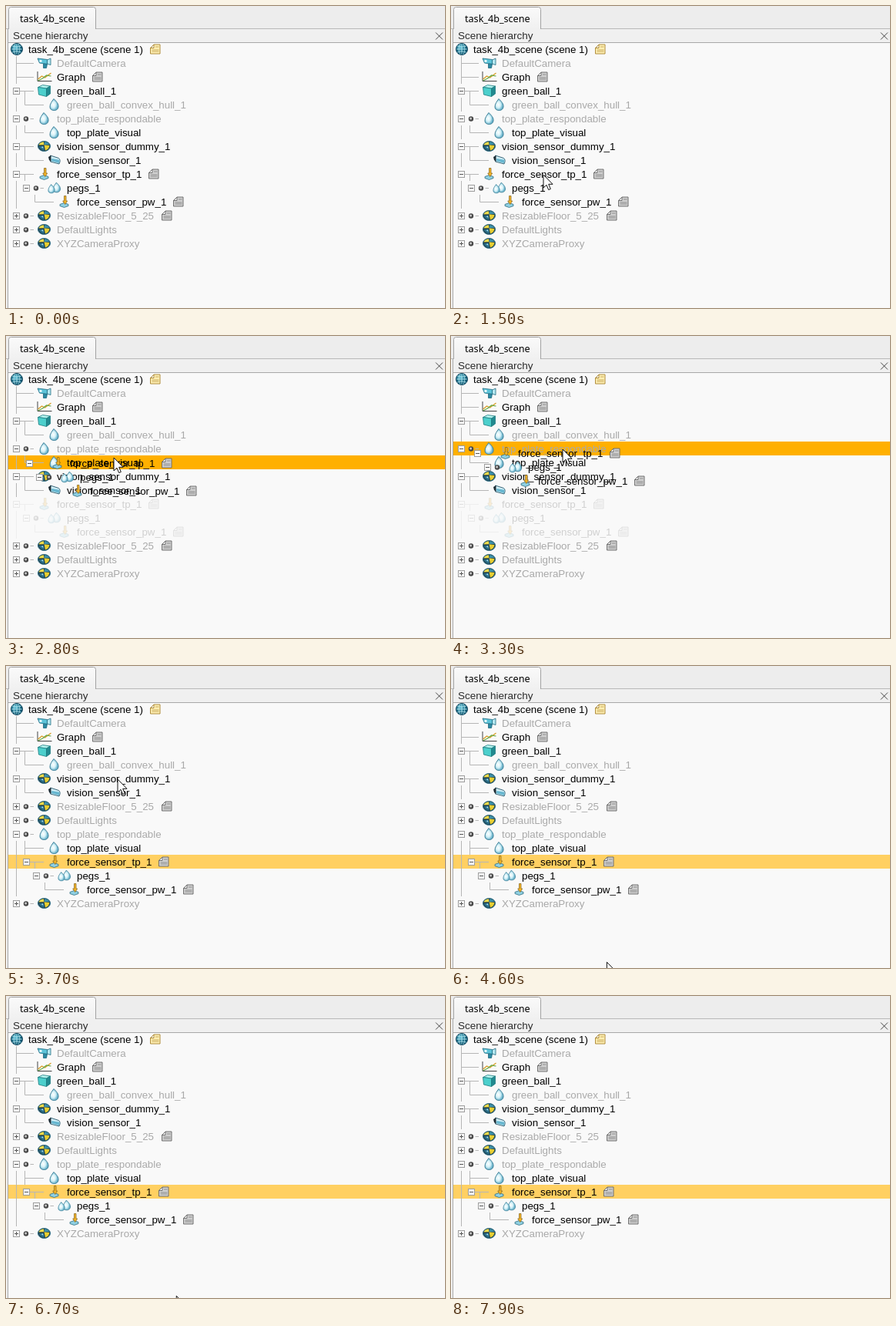
An HTML page for the animation above (8 s loop, 570 px wide and 392 px high).

```html
<!DOCTYPE html>
<html lang="en">
<head>
<meta charset="utf-8">
<title>Scene hierarchy</title>
<style>
  html, body { margin: 0; width: 100%; height: 100%; overflow: hidden; background: #f9f9f9; }
  svg { display: block; width: 570px; height: 392px; }
  text { font: 13.33px "Liberation Sans", Arial, sans-serif; fill: #000; white-space: pre; }
  .dim { fill: #a9a9a9; }
  .tab { font: 12.6px "Noto Sans", sans-serif; }
  .head { font-size: 13.5px; fill: #2c2c2c; }
  .link { fill: none; stroke: #b6b6b6; }
</style>
</head>
<body>
<svg viewBox="0 0 570 392">
  <defs>
    <linearGradient id="tabFill" x2="0" y2="1"><stop stop-color="#fafafa"/><stop offset="1" stop-color="#f0f0f0"/></linearGradient>
    <radialGradient id="dropFill" cx=".4" cy=".5"><stop stop-color="#fff"/><stop offset=".55" stop-color="#d3f1f8"/><stop offset="1" stop-color="#6bb4cc"/></radialGradient>
    <radialGradient id="globeFill" cx=".4" cy=".35"><stop stop-color="#62c6dc"/><stop offset="1" stop-color="#07536f"/></radialGradient>
    <g id="globe">
      <circle r="7.5" fill="url(#globeFill)" stroke="#0b4058"/>
      <path d="M-7 0H7M0-7V7M-6-4Q0-2 6-4M-6 4Q0 2 6 4M-2-7Q-6 0-2 7M2-7Q6 0 2 7" fill="none" stroke="#b5e6ef" stroke-width=".8"/>
    </g>
    <g id="camera" stroke="#1d6a80" stroke-width=".8">
      <path d="M-8.5-6L4-4.5V1.5L-6 0Z" fill="#5cc3d8"/>
      <path d="M4-4L8.5-6V2.5L4 1Z" fill="#b4e8f1"/>
      <path d="M-1 1L4 1.5L3 6.5H-1Z" fill="#2b8aa3"/>
      <circle cx="-4.5" cy="-2.6" r="1.7" fill="#e6fafd" stroke="none"/>
    </g>
    <g id="graph" fill="none">
      <path d="M-8.5-7V5.5H10" stroke="#444"/>
      <path d="M-8 3L-3-1L1 1L9-5" stroke="#d89a20" stroke-width="1.2"/>
      <path d="M-8 5L-2 2L3-2L9-1" stroke="#63a846" stroke-width="1.2"/>
    </g>
    <g id="cube" stroke="#1d7b80" stroke-width=".8">
      <path d="M-8-4.5L-2-7.5L8-6L3-3Z" fill="#b2f2ee"/>
      <path d="M-8-4.5L3-3V7.5L-7 5Z" fill="#4ccfcc"/>
      <path d="M3-3L8-6V4L3 7.5Z" fill="#218a90"/>
    </g>
    <path id="drop" d="M-.5-7.5C3-4 6-1 5.5 3C5 6 3 7.5 0 7.5C-3 7.5-5.5 6-5.5 3C-5.5-1-3-4-.5-7.5Z" fill="url(#dropFill)" stroke="#3f8098"/>
    <g id="pegs">
      <use href="#drop" transform="translate(3.3 -.5)scale(.85)"/>
      <use href="#drop" transform="translate(-3.5 1.2)scale(.75)"/>
    </g>
    <g id="dummy">
      <ellipse rx="8" ry="6.5" fill="#1b3440" stroke="#2d6f86"/>
      <path d="M-7-1.5Q-5.5-5.5-.5-5.8L0-1.8Z" fill="#eedc4a"/>
      <path d="M0-1.8L7-1Q6.5 4 1.5 5.5Z" fill="#e8cf32"/>
      <path d="M.5-5.8Q5-5.5 7-2L0-1.8Z" fill="#3b8ea9"/>
      <path d="M-7 0L-.5-.5L.5 5.8Q-5.5 5-7 0Z" fill="#286d88"/>
      <path d="M-4 1L-1.5.6L-1 3Z" fill="#a9dfed"/>
    </g>
    <g id="vision">
      <path d="M-5-6L6-2.5Q9 0 6.5 5L-5 2Z" fill="#d3f0f8" stroke="#27566a" stroke-width=".9"/>
      <path d="M-4 1L6.5 4L7-.2L-3-2Z" fill="#68b7d0"/>
      <path d="M-7.5-4L-4-6V2L-6.5 0Z" fill="#1d2b33"/>
    </g>
    <g id="force">
      <path d="M-5.5 3.5L0 1.5L5.5 3.5V5.5L0 7.5L-5.5 5.5Z" fill="#8fd0e2" stroke="#2f6c82" stroke-width=".8"/>
      <path d="M0-7.5H2.5V-1H4.2L1.2 3.5L-1.8-1H0Z" fill="#f3b326" stroke="#80611a" stroke-width=".7"/>
    </g>
    <g id="sheet" stroke-width=".9">
      <path d="M-2-6.5H6V5.5H-6.5V-2Z"/>
      <path d="M-2-6.5V-2H-6.5Z" fill="#f4f4f4"/>
      <path d="M0-3.5H4.5M-4.5.5H4.5M-4.5 2.5H4.5" fill="none" opacity=".7"/>
    </g>
    <g id="dot"><circle r="3.2" fill="#484848"/><circle cx="-.4" cy="-.6" r="1.5" fill="#c4c4c4"/></g>
    <g id="box"><rect x="-4" y="-4" width="8" height="8" fill="#fcfcfc" stroke="#9c9c9c"/><path d="M-2.5 0H2.5" stroke="#555"/></g>
  </defs>

  <rect width="570" height="392" fill="#f9f9f9"/>
  <rect width="570" height="30" fill="#ededed"/>
  <path d="M0 29.5H570" stroke="#b8b8b8"/>
  <path d="M3.5 30V4.5Q3.5 1.5 6.5 1.5H113.5Q116.5 1.5 116.5 4.5V30" fill="url(#tabFill)" stroke="#a2a2a2"/>
  <text class="tab" x="18" y="21">task_4b_scene</text>
  <rect x="2" y="30" width="568" height="17" fill="#f0f0f0"/>
  <path d="M2 47.5H570" stroke="#a8a8a8"/>
  <text class="head" x="9" y="43">Scene hierarchy</text>
  <path d="M558 34.5L567 43.5M567 34.5L558 43.5" stroke="#333" stroke-width=".9"/>
  <rect y="30" width="2" height="362" fill="#f0f0f0"/>
  <path d="M2.5 30V392" stroke="#a8a8a8"/>

  <rect id="band" x="3" width="567" height="18"/>
  <g id="before"></g>
  <g id="source"></g>
  <g id="after"></g>
  <g id="drag"></g>
  <path id="cursor" d="M0 0V17L4 13.3L6.7 19.6L9.3 18.5L6.7 12.3H12Z" fill="#fff" stroke="#111"/>
</svg>
<script>
const $ = id => document.getElementById(id);
const STEP = 18, LOOP = 8000, TICK = 100;
const DRAG_START = 2300, DROP = 3700;
const rowY = i => 56 + STEP * i;
const boxX = depth => 13.5 + 13 * (depth - 1);
const stemX = depth => boxX(depth) - (depth > 1 ? 2 : 0);

// marks: - open, + closed, o dot, d dimmed
const node = (depth, name, icon, marks = '', sheet = 0) => ({ depth, name, icon, marks, sheet });
const hasBox = n => /[-+]/.test(n.marks);
const hasDot = n => n.marks.includes('o');

const head = [
  node(0, 'task_4b_scene (scene 1)', 'globe', '', 194),
  node(1, 'DefaultCamera', 'camera', 'd'),
  node(1, 'Graph', 'graph', '', 119),
  node(1, 'green_ball_1', 'cube', '-'),
  node(2, 'green_ball_convex_hull_1', 'drop', 'd')
];
const plate = [node(1, 'top_plate_respondable', 'drop', '-od'), node(2, 'top_plate_visual', 'drop')];
const vision = [node(1, 'vision_sensor_dummy_1', 'dummy', '-'), node(2, 'vision_sensor_1', 'vision')];
const force = [
  node(1, 'force_sensor_tp_1', 'force', '-', 192),
  node(2, 'pegs_1', 'pegs', '-o'),
  node(3, 'force_sensor_pw_1', 'force', '', 224)
];
const floor = [node(1, 'ResizableFloor_5_25', 'dummy', '+od', 209), node(1, 'DefaultLights', 'dummy', '+od')];
const proxy = node(1, 'XYZCameraProxy', 'dummy', '+od');
const nested = force.map(n => ({ ...n, depth: n.depth + 1, sheet: n.sheet && n.sheet + 13 }));

const treeA = [...head, ...plate, ...vision, ...force, ...floor, proxy];
const treeB = [...head, ...vision, ...floor, ...plate, ...nested, proxy];

const use = (id, x, y) => `<use href="#${id}" x="${x}" y="${y}"/>`;

// true when a later row continues the branch at this depth
function continues(tree, i, depth) {
  const next = tree.slice(i + 1).find(n => n.depth <= depth);
  return next && next.depth === depth;
}

function link(tree, i) {
  const n = tree[i], y = rowY(i) + .5, top = rowY(i) - 9, end = top + STEP;
  let d = '';
  for (let k = 1; k <= n.depth; k++) {
    if (k === n.depth && hasBox(n)) continue;
    const more = continues(tree, i, k);
    if (more || k === n.depth) d += `M${stemX(k)} ${top}V${more ? end : y}`;
  }
  if (n.depth) d += `M${hasDot(n) ? boxX(n.depth) + 18 : stemX(n.depth)} ${y}H${boxX(n.depth) + 22.5}`;
  if (n.marks.includes('-') && !hasDot(n)) d += `M${stemX(n.depth + 1)} ${y}V${end}`;
  return `<path class="link" d="${d}"/>`;
}

function label(tree, i) {
  const n = tree[i], y = rowY(i), bx = boxX(n.depth);
  const ink = n.depth ? 'fill="#cfcfcf" stroke="#666"' : 'fill="#ffefb4" stroke="#a8832c"';
  let s = '';
  if (hasBox(n)) s += use('box', bx, y + .5);
  if (n.marks.includes('+')) s += `<path d="M${bx} ${y - 2}V${y + 3}" stroke="#555"/>`;
  if (hasDot(n)) s += use('dot', bx + 12.5, y + .5);
  s += use(n.icon, n.depth ? bx + 36 : 14, y);
  s += `<text x="${n.depth ? bx + 52.5 : 29}" y="${y + 5}"${n.marks.includes('d') ? ' class="dim"' : ''}>${n.name}</text>`;
  if (n.sheet) s += `<g ${ink}>${use('sheet', n.sheet, y + .5)}</g>`;
  return s;
}

function fill(id, tree, keep, links = true) {
  const rows = tree.map((_, i) => i).filter(i => keep(tree[i]));
  $(id).innerHTML = (links ? rows.map(i => link(tree, i)).join('') : '') +
    rows.map(i => label(tree, i)).join('');
}

const isForce = n => force.includes(n);
fill('before', treeA, n => !isForce(n));
fill('source', treeA, isForce);
fill('drag', treeA, isForce, false);
fill('after', treeB, () => true);

// keys: [time, x, y]
const pointerKeys = [
  [1000, 560, 262], [1200, 270, 236], [1400, 122, 220], [1500, 120, 219], [2200, 121, 217],
  [2500, 128, 198], [2800, 140, 158], [3000, 145, 147], [3900, 145, 147], [4200, 170, 270],
  [4500, 202, 384], [5600, 206, 388], [6400, 220, 389], [7600, 225, 390], [7800, 225, 394]
];
const dragKeys = [[DRAG_START, 0, 0], [2500, 2, -9], [2800, 17, -53], [3000, 21, -66], [DROP, 21, -66]];

function at(keys, t) {
  let i = keys.findIndex(k => k[0] > t);
  if (i < 0) i = keys.length - 1;
  if (i === 0) i = 1;
  const [a, b] = [keys[i - 1], keys[i]];
  const u = Math.min(1, Math.max(0, (t - a[0]) / (b[0] - a[0])));
  return [1, 2].map(k => a[k] + (b[k] - a[k]) * u);
}

const show = (id, on) => { $(id).style.display = on ? '' : 'none'; };
const place = (id, [x, y]) => $(id).setAttribute('transform', `translate(${x} ${y})`);

// row under the highlight and its colour
function highlight(t, dragY) {
  const own = treeA.indexOf(force[0]);
  if (t >= DROP) return [treeB.indexOf(nested[0]), '#ffd062'];
  if (t >= 1700 && t < 1900) return [own, '#ffd062'];
  if (t < DRAG_START) return null;
  const row = Math.round(own + dragY / STEP);
  return row < own && t > 2500 ? [row, '#ffb000'] : null;
}

function draw(ms) {
  const t = Math.floor((ms % LOOP) / TICK) * TICK;
  const dropped = t >= DROP, dragging = t >= DRAG_START && !dropped;
  const shift = at(dragKeys, t);
  show('before', !dropped);
  show('source', !dropped);
  show('after', dropped);
  show('drag', dragging);
  $('source').setAttribute('opacity', dragging ? .16 : 1);
  place('drag', shift);

  const band = highlight(t, shift[1]);
  show('band', band);
  if (band) {
    $('band').setAttribute('y', rowY(band[0]) - 9);
    $('band').setAttribute('fill', band[1]);
  }
  show('cursor', t >= 1000 && t < 7800);
  place('cursor', at(pointerKeys, t));
}

const begin = performance.now();
function loop() {
  draw(performance.now() - begin);
  requestAnimationFrame(loop);
}
loop();
</script>
</body>
</html>
```
